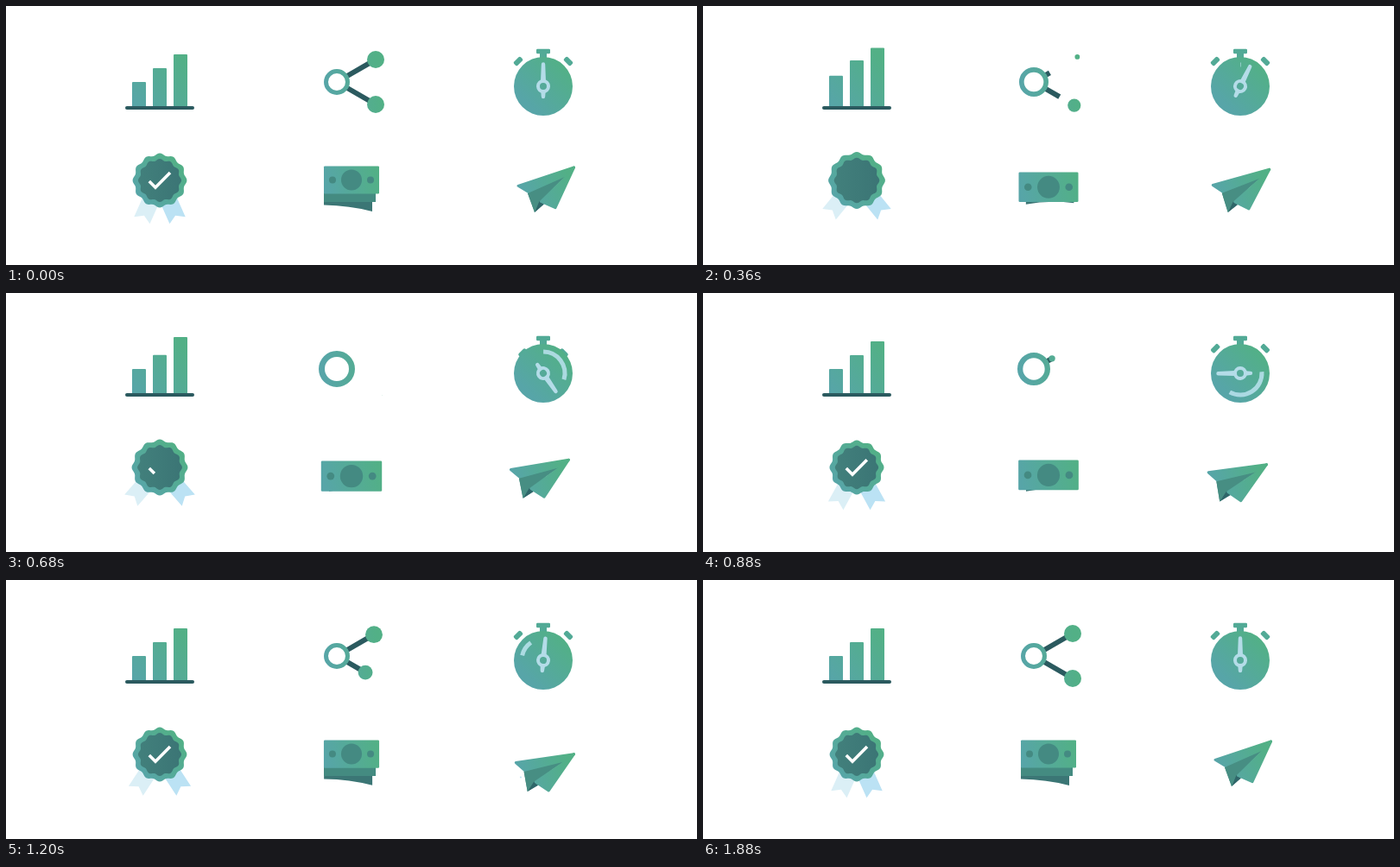
An HTML page that plays this animation: 800x300 px, repeating every 2.88 s.

```html
<!DOCTYPE html>
<html lang="en">
<head>
<meta charset="utf-8">
<title>Icon set</title>
<style>
  html, body { margin: 0; width: 100%; height: 100%; overflow: hidden; background: #fff; }
  svg { display: block; width: 100vw; height: 100vh; }
</style>
</head>
<body>
<svg viewBox="0 0 800 300">
  <defs>
    <linearGradient id="base">
      <stop offset="0" stop-color="#57a5a8"/>
      <stop offset="1" stop-color="#52b086"/>
    </linearGradient>
    <linearGradient id="gBars" href="#base" gradientUnits="userSpaceOnUse" x1="146" y1="112" x2="206" y2="62"/>
    <linearGradient id="gShare" href="#base" gradientUnits="userSpaceOnUse" x1="368" y1="92" x2="432" y2="84"/>
    <linearGradient id="gWatch" href="#base" gradientUnits="userSpaceOnUse" x1="604" y1="114" x2="648" y2="70"/>
    <linearGradient id="gBadge" href="#base" gradientUnits="userSpaceOnUse" x1="-24" y1="20" x2="24" y2="-20"/>
    <linearGradient id="gBill" href="#base" gradientUnits="userSpaceOnUse" x1="-30" y1="8" x2="30" y2="-8"/>
    <linearGradient id="gPlane" href="#base" gradientUnits="userSpaceOnUse" x1="600" y1="222" x2="652" y2="196"/>
    <linearGradient id="gSeal" x1="0" y1="0" x2="1" y2="0">
      <stop offset="0" stop-color="#42807c"/>
      <stop offset="1" stop-color="#3b7575"/>
    </linearGradient>
  </defs>

  <g id="bars" fill="url(#gBars)"></g>
  <rect x="138" y="116" width="80" height="4" rx="2" fill="#2b5a5f"/>

  <g stroke="#2b5a5f" stroke-width="6">
    <line id="link0" x1="383" y1="88"/>
    <line id="link1" x1="383" y1="88"/>
  </g>
  <g fill="url(#gShare)">
    <circle id="node0"/>
    <circle id="node1"/>
  </g>
  <circle id="ring" cx="383" cy="88" fill="#fff" stroke="url(#gShare)"/>

  <g fill="#52aa96">
    <rect id="ear0" x="-5.5" y="-3" width="11" height="6" rx="1.8"/>
    <rect id="ear1" x="-5.5" y="-3" width="11" height="6" rx="1.8"/>
    <rect x="614" y="49.7" width="16" height="5.6" rx="1.4"/>
    <rect x="618" y="54" width="8" height="8"/>
  </g>
  <circle cx="622" cy="93" r="34" fill="url(#gWatch)"/>
  <path id="sweep" fill="none" stroke="#b8e1ec" stroke-width="5" opacity=".88"/>
  <g id="hand" fill="#b4dce8">
    <path d="M-3 -6L-2.2 -25.5A2.2 2.2 0 0 1 2.2 -25.5L3 -6ZM-2.7 6L-2.2 12A2.2 2.2 0 0 0 2.2 12L2.7 6Z"/>
    <circle r="6" fill="none" stroke="#b4dce8" stroke-width="4"/>
  </g>

  <g transform="translate(178 202)">
    <path id="tail0" d="M-10 0V50.6L0 44.5L10 50.6V0Z" fill="#dbeff6"/>
    <path id="tail1" d="M-10 0V50.6L0 44.5L10 50.6V0Z" fill="#bbe2f4"/>
    <g id="seal">
      <path id="rim" fill="url(#gBadge)"/>
      <path id="core" fill="url(#gSeal)"/>
    </g>
    <path id="tick" d="M-12.2 1L-5 8.2L12 -9" fill="none" stroke="#fff" stroke-width="3.6" pathLength="100"/>
  </g>

  <path id="note2" fill="#3b7675"/>
  <path id="note1" fill="#448b81"/>
  <g id="bill">
    <rect x="-32" y="-16" width="64" height="32" rx="1.2" fill="url(#gBill)"/>
    <g fill="#448a82">
      <circle r="12"/>
      <circle cx="-22" r="4"/>
      <circle cx="22" r="4"/>
    </g>
  </g>

  <g stroke="#c2e6f3" stroke-width="2" stroke-linecap="round" id="wind"></g>
  <g id="plane" stroke-width="3" stroke-linejoin="round">
    <path d="M604 217L612 239L622 229.500L632 214L640 200Z" fill="#478e83"/>
    <path d="M612 239L617 226L623 229.500Z" fill="#2f6669"/>
    <path d="M593 208.300L657.500 187L648 197L605 215.500Z" fill="url(#gPlane)" stroke="url(#gPlane)"/>
    <path d="M604 217L648 197.500L617.500 226L612 239Z" fill="#478e83"/>
    <path d="M657.500 187L636 233.700L619.500 226.500L648 198.500Z" fill="url(#gPlane)" stroke="url(#gPlane)"/>
  </g>
</svg>
<script>
const LOOP = 2880, END = 1880, STEP = 40;
const $ = id => document.getElementById(id);
const set = (el, attrs) => { for (const k in attrs) el.setAttribute(k, attrs[k]); };
const add = (parent, tag, attrs) => {
  const el = document.createElementNS('http://www.w3.org/2000/svg', tag);
  set(el, attrs);
  return $(parent).appendChild(el);
};
const mix = (a, b, p) => a + (b - a) * p;
const sine = x => (1 - Math.cos(Math.PI * x)) / 2;
const quad = x => x < .5 ? 2 * x * x : 1 - 2 * (1 - x) ** 2;
const cubic = x => x < .5 ? 4 * x ** 3 : 1 - 4 * (1 - x) ** 3;
const outQuad = x => 1 - (1 - x) ** 2;
const ramp = (t, a, b, ease = sine) => ease(Math.min(1, Math.max(0, (t - a) / (b - a))));
const pulse = (t, a, b, c, d) => ramp(t, a, b) - ramp(t, c, d);

// Smooth curve through [time, value] points, flat at turning points and ends.
function track(t, pts) {
  const last = pts.length - 1;
  if (t <= pts[0][0]) return pts[0][1];
  if (t >= pts[last][0]) return pts[last][1];
  const rise = k => (pts[k + 1][1] - pts[k][1]) / (pts[k + 1][0] - pts[k][0]);
  const slope = k => {
    if (k === 0 || k === last) return 0;
    const a = rise(k - 1), b = rise(k);
    return a * b <= 0 ? 0 : 2 * a * b / (a + b);
  };
  let i = 0;
  while (t > pts[i + 1][0]) i++;
  const [t0, v0] = pts[i], [t1, v1] = pts[i + 1];
  const h = t1 - t0, x = (t - t0) / h, y = 1 - x;
  return y * y * (1 + 2 * x) * v0 + x * x * (1 + 2 * y) * v1
    + h * x * y * (y * slope(i) - x * slope(i + 1));
}

function scallop(r, amp) {
  let d = '';
  for (let a = 0; a < 360; a += 3) {
    const w = a * Math.PI / 180, q = r + amp * Math.cos(12 * w);
    d += (a ? 'L' : 'M') + (q * Math.sin(w)).toFixed(2) + ' ' + (-q * Math.cos(w)).toFixed(2);
  }
  return d + 'Z';
}
set($('rim'), { d: scallop(30.2, 1.2) });
set($('core'), { d: scallop(24, 1.1) });

const bars = [0, 1, 2].map(i => add('bars', 'rect', { x: 146 + 24 * i, width: 16, rx: 1 }));
const gusts = [[596, 228.5, 584.5, 232.5], [608, 227, 594, 233], [607, 236, 600, 239]]
  .map(seg => ({ seg, el: add('wind', 'line', {}) }));

function drawBars(t) {
  bars.forEach((bar, i) => {
    const s = t - 120 * i;
    const lift = (8 + i) * (ramp(s, 0, 240, outQuad) - ramp(s, 240, 640, cubic));
    const top = 88 - 16 * i - lift;
    set(bar, { y: top, height: 117 - top });
  });
}

function drawShare(t) {
  [-1, 1].forEach((side, i) => {
    const s = t - 160 * i;
    const back = s > 700;
    const out = ramp(s, 0, 580, quad), p = ramp(s, 700, 1300);
    const reach = back ? mix(.33, 1, p) : 1;
    const rope = back ? reach : 1 - ramp(s, -15, 620, x => x);
    const drift = back ? 0 : 7.5 * out;
    set($('link' + i), { x2: 383 + 45 * rope, y2: 88 + side * 26 * rope });
    set($('node' + i), {
      cx: 383 + 45 * reach + drift,
      cy: 88 + side * (26 * reach + drift * .58),
      r: 10 * (back ? outQuad(p) : 1 - out)
    });
  });
  const size = 1 + .4 * pulse(t, 140, 700, 700, 1160);
  set($('ring'), { r: 12.5 * size, 'stroke-width': 5 * size });
}

function drawWatch(t) {
  const push = 5.5 * pulse(t, 480, 640, 720, 900);
  set($('ear0'), { transform: `translate(${593 + push} ${64 + push}) rotate(-45)` });
  set($('ear1'), { transform: `translate(${651 - push} ${64 + push}) rotate(45)` });
  const angle = 382 * ramp(t, -55, 1555, cubic) - 22 * ramp(t, 1560, 1880);
  set($('hand'), { transform: `translate(622 93) rotate(${angle})` });

  const head = track(t, [[340, 0], [360, 1.5], [680, 107], [1040, 284], [1200, 325], [1400, 360]]);
  const tail = track(t, [[670, 0], [1040, 190], [1200, 283], [1400, 360]]);
  const at = a => {
    const w = a * Math.PI / 180;
    return (622 + 25 * Math.sin(w)) + ' ' + (93 - 25 * Math.cos(w));
  };
  set($('sweep'), {
    d: head - tail > .2 ? `M${at(tail)}A25 25 0 ${+(head - tail > 180)} 1 ${at(head)}` : ''
  });
}

function drawBadge(t) {
  const swing = 24 + track(t, [[0, 0], [480, 18], [640, 17.8], [990, .8], [1200, 9.2], [1560, .8], [1880, 0]]);
  set($('tail0'), { transform: `rotate(${swing})` });
  set($('tail1'), { transform: `scale(-1 1) rotate(${swing})` });
  set($('seal'), { transform: `scale(${1 + .05 * pulse(t, 0, 400, 500, 960)})` });
  const redraw = t > 480;
  const from = redraw ? 0 : 100 * ramp(t, 0, 320);
  const to = redraw ? 100 * ramp(t, 570, 900) : 100;
  set($('tick'), {
    'stroke-dasharray': `${to - from} 200`,
    'stroke-dashoffset': -from,
    visibility: to - from > .1 ? 'visible' : 'hidden'
  });
}

function drawMoney(t) {
  const p = pulse(t, 0, 520, 780, 1240);
  set($('bill'), { transform: `translate(400 ${201.4 + 10.7 * p}) scale(${1 + .1 * p})` });
  const m = pulse(t, 0, 400, 1000, 1220);
  const top = 200 + 10 * m;
  set($('note1'), {
    d: `M${368 + 4 * m} ${top}H${428 + 2 * m}V${227 - 4 * m}H${368 + 4 * m}Z`
  });
  set($('note2'), {
    d: `M${368 + 6 * m} ${top}H${424 + 5.5 * m}V${238 - 10 * m}`
      + `Q${398 + 2 * m} ${231 - 6.5 * m} ${368 + 6 * m} ${230.5 - .8 * m}Z`
  });
}

function drawPlane(t) {
  const path = vals => track(t, [0, 360, 680, 1040, 1200, 1560, 1880].map((k, i) => [k, vals[i]]));
  const turn = path([0, 2.8, 8.7, 11.2, 9.9, 3.6, 0]);
  const dx = path([0, -2.2, -7.2, -4.7, -1.2, .8, 0]);
  const dy = path([0, .7, 1.3, 8.7, 9, 3.3, 0]);
  set($('plane'), { transform: `translate(${dx} ${dy}) rotate(${turn} 625.2 196.8)` });

  const head = ramp(t, 1180, 1520), tail = ramp(t, 1400, 1700);
  gusts.forEach(({ seg: [x1, y1, x2, y2], el }) => set(el, {
    x1: mix(x1, x2, tail), y1: mix(y1, y2, tail),
    x2: mix(x1, x2, head), y2: mix(y1, y2, head),
    visibility: head - tail > .002 ? 'visible' : 'hidden'
  }));
}

function draw(t) {
  drawBars(t);
  drawShare(t);
  drawWatch(t);
  drawBadge(t);
  drawMoney(t);
  drawPlane(t);
}

const start = performance.now();
function tick() {
  const t = (performance.now() - start) % LOOP;
  draw(Math.min(END, Math.floor(t / STEP) * STEP));
  requestAnimationFrame(tick);
}
tick();
</script>
</body>
</html>
```
